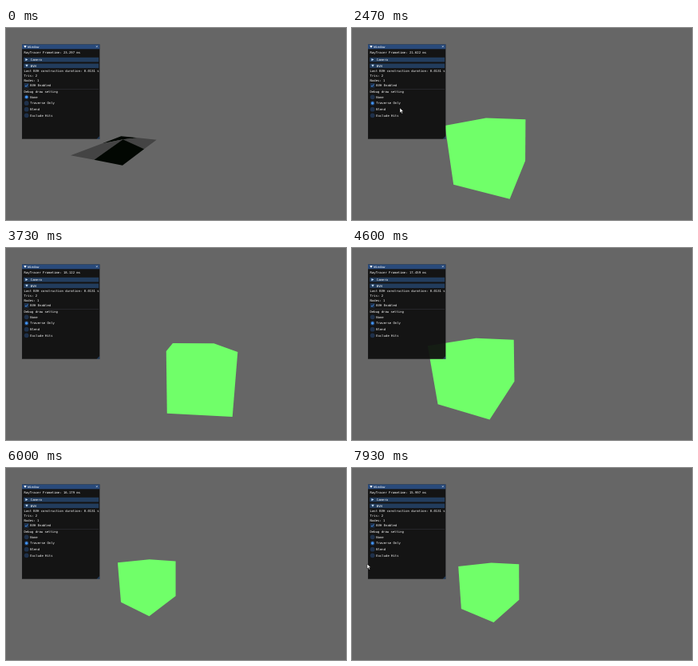
These frames come from a looping animation (426 by 240 pixels, 8000 ms). An HTML page:

```html
<!DOCTYPE html>
<html lang="en">
<head>
<meta charset="utf-8">
<title>Ray tracer debug window</title>
<style>
  html, body { margin: 0; width: 100%; height: 100%; overflow: hidden; background: #666; }
  svg { display: block; width: 100vw; height: 100vh; }
  text { font: 39px "DejaVu Sans Mono", monospace; fill: #fff; white-space: pre; text-rendering: geometricPrecision; }
</style>
</head>
<body>
<svg viewBox="0 0 426 240">
  <rect width="426" height="240" fill="#666"/>
  <g id="surface"></g>
  <polygon id="cube" fill="#70ff69"/>
  <g id="panel">
    <rect x="20" y="20.5" width="97.4" height="118.3" fill="#0f0f0f" fill-opacity=".94" stroke="#6e6e80" stroke-opacity=".3" stroke-width=".3"/>
    <rect x="20" y="20.5" width="97.4" height="5.8" fill="#294a7a"/>
    <path d="M22.3 22 h3.4 l-1.7 3z M24.4 37.9 v3.4 l3 -1.7z M24.3 45.8 h3.4 l-1.7 3z" fill="#fff"/>
    <path d="M112.8 22.2 l2 2 m0 -2 l-2 2" stroke="#fff" stroke-width=".45"/>
    <g fill="#4296fa" fill-opacity=".31">
      <rect x="22.2" y="36.8" width="94" height="5.6"/>
      <rect x="22.2" y="44.5" width="94" height="5.6"/>
      <path d="M117.3 135 v3.7 h-3.7z"/>
    </g>
    <rect x="22.8" y="69" width="5.6" height="5.6" fill="#294a7a" fill-opacity=".54"/>
    <path d="M24 72 l1.2 1.3 2.2 -2.8" fill="none" stroke="#4296fa" stroke-width=".8"/>
    <path d="M22.2 76.5 h94" stroke="#6e6e80" stroke-opacity=".5" stroke-width=".4"/>
  </g>
  <path id="cursor" d="M0 0 v6 l1.4 -1.3 1.1 2.4 1 -.5 -1.1 -2.3 h2z" fill="#fff" stroke="#000" stroke-width=".4"/>
</svg>
<script>
const TICKS = 120, TICK_MS = 200 / 3;
const SELECT = 31, DRAG = 38, RELEASE = 119;
const FOCAL = 120, EYE_HEIGHT = 1.55;
const $ = id => document.getElementById(id);

function add(parent, tag, attrs) {
  const node = document.createElementNS('http://www.w3.org/2000/svg', tag);
  for (const name in attrs) node.setAttribute(name, attrs[name]);
  return parent.appendChild(node);
}

function label(text, x, y) {
  const node = add($('panel'), 'text', { transform: `translate(${x} ${y}) scale(.1)` });
  node.textContent = text;
  return node;
}

label('Window', 27.2, 24.8);
label('Camera', 30.8, 41);
label('BVH', 30.8, 48.7);
const frameTime = label('', 22.6, 32.4);
['Last BVH construction duration: 0.0131 s', 'Tris: 2', 'Nodes: 1']
  .forEach((text, i) => label(text, 22.6, 55.3 + 5.6 * i));
label('BVH Enabled', 30.3, 73.2);
label('Debug draw setting', 22.6, 81);

const radios = ['None', 'Traverse Only', 'Blend', 'Exclude Hits'].map((name, i) => {
  const cy = 86.3 + 7.67 * i;
  label(name, 30.3, cy + 1.4);
  return {
    ring: add($('panel'), 'circle', { cx: 25.7, cy, r: 2.9 }),
    dot: add($('panel'), 'circle', { cx: 25.7, cy, r: 1.75, fill: '#4296fa' })
  };
});

// Camera path: tick, sideways, distance, heading in degrees, downward slope, frame time.
const cameraPath = [
  [0, 2.96, 2.84, 15, .192, 23.297],
  [1, 2.28, 3.03, 15, .192, 22.17],
  [34, 2.28, 3.03, 15, .192, 22.17],
  [45, .91, 3.36, 13.3, .15, 20.16],
  [50, -1.45, 3.9, 4, .13, 19],
  [56, -.55, 3.71, 3.5, .125, 18.122],
  [65, 1.6, 2.95, 15, .18, 17.6],
  [80, 4.95, 2.93, 18, .167, 17.073],
  [92, 3.46, 3.51, 34, .13, 16],
  [101, 3.46, 3.51, 25.6, .13, 15.247],
  [112, 3.46, 3.51, 35.5, .08, 15.7],
  [119, 3.46, 3.51, 26.8, .104, 15.997]
];
const cursorPath = [[7, 273, 114], [12, 264, 113], [22, 4, 97], [27, 42, 95.3], [31, 26, 94], [37, 60, 100]];

function sample(path, tick) {
  const next = path.findIndex(key => key[0] > tick);
  if (next < 1) return path[next ? path.length - 1 : 0].slice(1);
  const a = path[next - 1], b = path[next];
  const k = (tick - a[0]) / (b[0] - a[0]);
  return a.map((v, i) => v + (b[i] - v) * k).slice(1);
}

// Perspective view of the scene, whose origin is the middle of the cube.
function projector([side, distance, heading, slope]) {
  const yaw = heading * Math.PI / 180, pitch = Math.atan(slope);
  const [sy, cy, sp, cp] = [Math.sin(yaw), Math.cos(yaw), Math.sin(pitch), Math.cos(pitch)];
  return ([x, y, z]) => {
    const dx = x - side, dz = z + distance, drop = EYE_HEIGHT - y;
    const right = dx * cy + dz * sy, ahead = dz * cy - dx * sy;
    const depth = ahead * cp + drop * sp;
    return [213 + FOCAL * right / depth, 120 + FOCAL * (drop * cp - ahead * sp) / depth];
  };
}

function hull(points) {
  const sorted = [...points].sort((a, b) => a[0] - b[0]);
  const chain = list => {
    const out = [];
    for (const p of list) {
      while (out.length > 1) {
        const [a, b] = out.slice(-2);
        if ((b[0] - a[0]) * (p[1] - a[1]) - (b[1] - a[1]) * (p[0] - a[0]) > 0) break;
        out.pop();
      }
      out.push(p);
    }
    return out.slice(0, -1);
  };
  return [...chain(sorted), ...chain(sorted.reverse())];
}

const ends = [-1, 1];
const cubeCorners = ends.flatMap(x => ends.flatMap(y => ends.map(z => [x, y, z])));

// A two by two checker whose middle is raised, far tiles first.
const surfacePoint = (x, z) => x || z ? [x, 0, z] : [.1, .28, 0];
const tiles = [0, -1].flatMap(z => [-1, 0].map(x => ({
  corners: [[x, z], [x + 1, z], [x + 1, z + 1], [x, z + 1]].map(c => surfacePoint(...c)),
  node: add($('surface'), 'polygon', { fill: x === z ? '#444' : '#020702' })
})));

const draw = (node, points) => node.setAttribute('points', points.join(' '));
const show = (node, on) => node.setAttribute('visibility', on ? 'visible' : 'hidden');

function render(ms) {
  const tick = Math.floor((ms + 4) / TICK_MS) % TICKS;
  const selected = tick >= SELECT, released = tick >= RELEASE;

  const camera = sample(cameraPath, tick);
  const project = projector(camera);
  draw($('cube'), hull(cubeCorners.map(project)));
  tiles.forEach(({ corners, node }) => draw(node, corners.map(project)));
  show($('cube'), selected);
  show($('surface'), !selected);
  frameTime.textContent = `RayTracer Frametime: ${camera[4].toFixed(3)} ms`;

  const [x, y] = released ? [19, 120] : sample(cursorPath, tick);
  $('cursor').setAttribute('transform', `translate(${x} ${y})`);
  show($('cursor'), released || (tick >= 7 && tick < DRAG));

  radios.forEach(({ ring, dot }, i) => {
    const hot = i === 1 && tick >= 24 && tick < 35;
    ring.setAttribute('fill', hot ? '#4296fa' : '#294a7a');
    ring.setAttribute('fill-opacity', hot ? .65 : .54);
    show(dot, i === (selected ? 1 : 0));
  });
}

const start = performance.now();
function animate() {
  render(performance.now() - start);
  requestAnimationFrame(animate);
}
animate();
</script>
</body>
</html>
```
